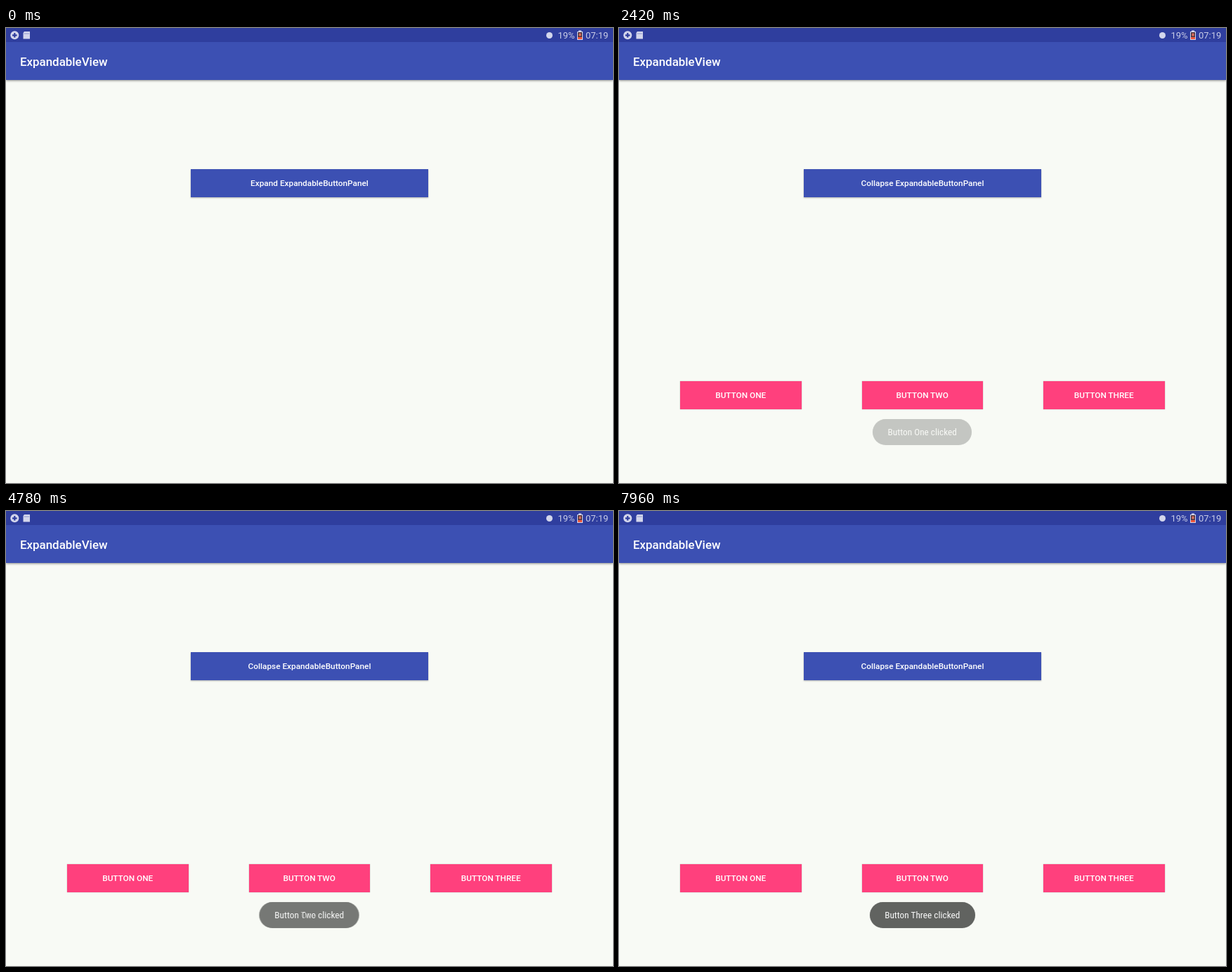
An HTML page that plays this animation: 864x648 px, repeating every 8 s.

```html
<!DOCTYPE html>
<html lang="en">
<head>
<meta charset="utf-8">
<title>Expandable panel</title>
<style>
  html, body { margin: 0; width: 100%; height: 100%; overflow: hidden; }
  body { background: #f8faf5; font-family: Roboto, sans-serif; color: #fff; }
  #stage { position: relative; width: 864px; height: 648px; overflow: hidden; }
  #stage div { position: absolute; box-sizing: border-box; }
  #bar { left: 0; top: 0; width: 864px; height: 74px; background: #3c50b3;
    box-shadow: 0 1px 3px rgba(0, 0, 0, .45); }
  #bar svg { position: absolute; left: 0; top: 0; }
  #panel { left: 0; top: 0; width: 864px; height: 648px; }
  .button { overflow: hidden; height: 40px; font: 500 11.8px/41px Roboto, sans-serif;
    text-align: center; white-space: nowrap; }
  .button .label { inset: 0; }
  .ripple { left: 50%; top: 50%; border-radius: 50%; background: #000; opacity: 0; }
  .toast { top: 557px; height: 37px; border-radius: 19px; background: #616360; opacity: 0;
    font: 400 13.3px/37px "Roboto Condensed", Roboto, sans-serif; font-stretch: 75%;
    text-align: center; white-space: nowrap; color: #fafafa;
    box-shadow: 0 0 1px rgba(0, 0, 0, .25); }
  .wide .toast { font-size: 12.4px; letter-spacing: -.3px; }
</style>
</head>
<body>
<div id="stage">
  <div id="bar">
    <svg width="864" height="74" font-family="Roboto, sans-serif">
      <rect width="864" height="20" fill="#2f3e9e"/>
      <g fill="#d3d6ec">
        <circle cx="12.3" cy="10.3" r="6"/>
        <path d="M26 5h8v10.5h-9.5v-8.5z"/>
        <circle cx="773.5" cy="10.5" r="4.5"/>
        <path d="M815 3.5h4v1.5h2v12h-8v-12h2z"/>
      </g>
      <path d="M12.3 7v6.600M9 10.3h6.600" stroke="#2f3e9e" stroke-width="2.2"/>
      <path d="M25.5 8h7.5" stroke="#8f98cc"/>
      <path d="M814 6h6v10h-6z" fill="#4a3440"/>
      <path d="M814 13h6v3h-6z" fill="#f0573c"/>
      <path d="M815.5 7.5h3v4h-3z" fill="#e2725c"/>
      <g fill="#c9cde8" font-size="13">
        <text x="785.5" y="15">19%</text>
        <text x="825" y="15">07:19</text>
      </g>
      <text x="20" y="54" fill="#fff" font-size="16.9" font-weight="500">ExpandableView</text>
    </svg>
  </div>
  <div id="panel"></div>
</div>
<script>
const LOOP = 8000;
const FADE = 1400;
const DECELERATE = 'cubic-bezier(.333, .667, .667, 1)';
const REST = '0 1px 2px rgba(0,0,0,.3)';
const FLAT = '0 0 1px rgba(0,0,0,.45)';
const RAISED = '0 3px 7px rgba(0,0,0,.4)';
const stage = document.getElementById('stage');
const panel = document.getElementById('panel');

// Steps are [ms, value, easing to the next step].
function track(el, prop, steps) {
  const all = [[0, steps[0][1]], ...steps, [LOOP, steps[steps.length - 1][1]]];
  const frames = all.map(([ms, value, easing = 'linear']) =>
    ({ offset: ms / LOOP, [prop]: value, easing }));
  el.animate(frames, { duration: LOOP, iterations: Infinity });
}

function add(parent, className, text = '') {
  const el = document.createElement('div');
  el.className = className;
  el.textContent = text;
  parent.append(el);
  return el;
}

function addButton(parent, x, y, width, color, shadow) {
  const el = add(parent, 'button');
  Object.assign(el.style, {
    left: x + 'px', top: y + 'px', width: width + 'px', background: color, boxShadow: shadow
  });
  const ripple = add(el, 'ripple');
  Object.assign(ripple.style, {
    width: width * 1.05 + 'px', height: width * 1.05 + 'px', margin: -width * .525 + 'px'
  });
  return el;
}

function press(el, down, held, up, end) {
  const ripple = el.querySelector('.ripple');
  const rest = el.style.boxShadow;
  track(el, 'boxShadow', [[down, rest], [held, RAISED], [up, RAISED], [end, rest]]);
  track(ripple, 'transform', [[down, 'scale(0)', DECELERATE], [up, 'scale(1)']]);
  track(ripple, 'opacity', [[down, 0], [down + 60, .12], [up, .12], [end, 0]]);
}

const toggle = addButton(stage, 263, 201, 338, '#3c50b3', REST);
const expand = add(toggle, 'label', 'Expand ExpandableButtonPanel');
const collapse = add(toggle, 'label', 'Collapse ExpandableButtonPanel');
press(toggle, 20, 280, 420, 820);
track(expand, 'opacity', [[440, 1], [440, 0]]);
track(collapse, 'opacity', [[440, 0], [440, 1]]);
track(panel, 'transform', [
  [420, 'translateY(150px)', 'ease-in-out'],
  [1240, 'translateY(0px)']
]);

const actions = [
  { name: 'One', x: 87, down: 1990, shown: 2160, pill: 141 },
  { name: 'Two', x: 345.5, down: 4040, shown: 4400, pill: 143 },
  { name: 'Three', x: 604, down: 6270, shown: 6530, pill: 150 }
];

actions.forEach(({ name, x, down, shown, pill }, i) => {
  const button = addButton(panel, x, 502.5, 172.5, '#ff407d', FLAT);
  add(button, 'label', `BUTTON ${name.toUpperCase()}`);
  press(button, down, down + 120, down + 220, down + 410);

  const toast = add(stage, 'toast', `Button ${name} clicked`);
  toast.style.left = 431.75 - pill / 2 + 'px';
  toast.style.width = pill + 'px';
  const fade = [[shown, 0, DECELERATE], [shown + FADE, 1]];
  const next = actions[i + 1];
  if (next) fade.push([next.shown, 1], [next.shown + FADE, 0]);
  track(toast, 'opacity', fade);
});

// Tighten the type when no condensed face is available.
const range = document.createRange();
range.selectNodeContents(stage.querySelector('.toast'));
stage.classList.toggle('wide', range.getBoundingClientRect().width > 105);
</script>
</body>
</html>
```
